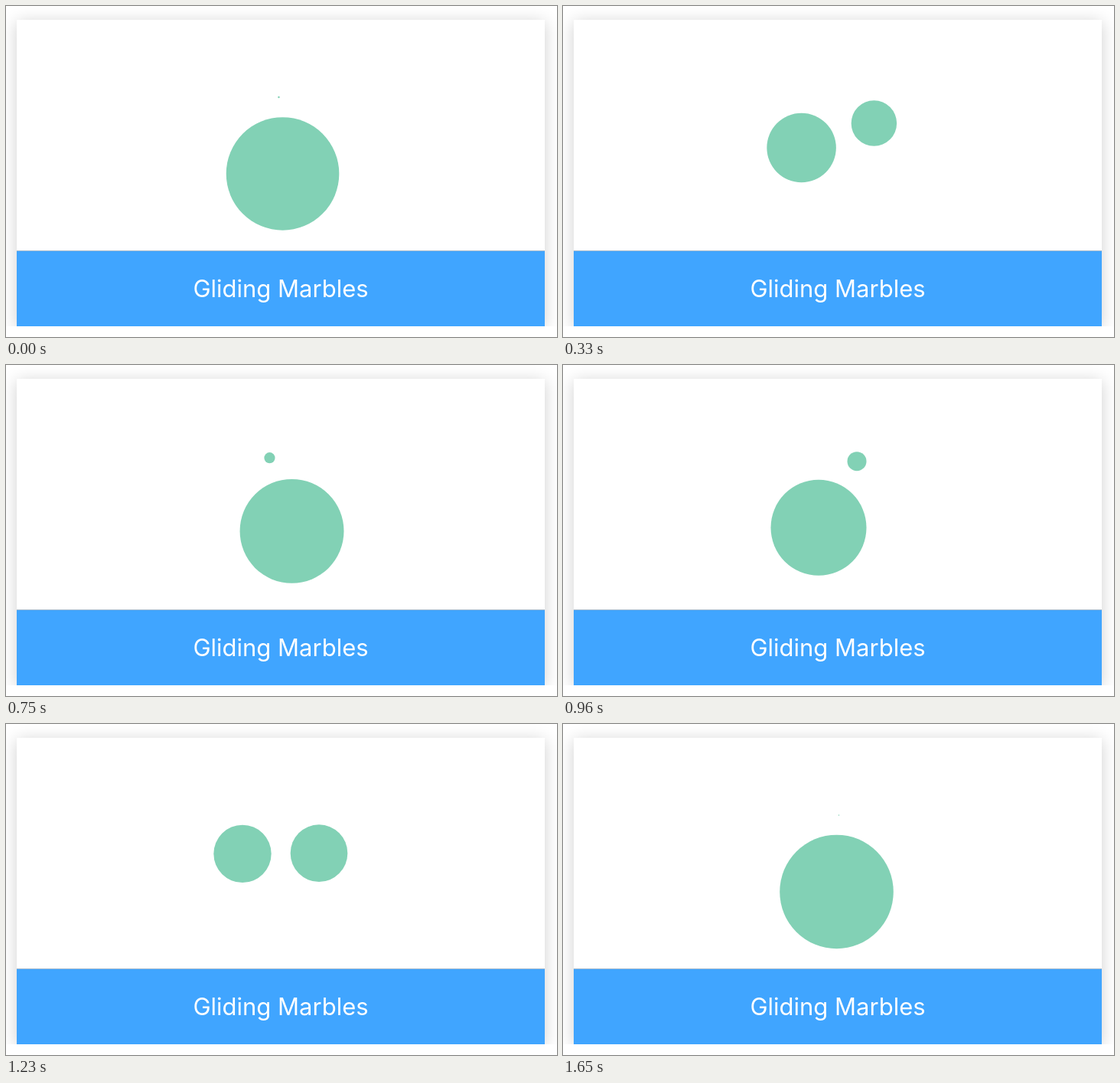
An HTML page that plays this animation: 720x432 px, repeating every 1680 ms.

```html
<!DOCTYPE html>
<html lang="en">
<head>
<meta charset="utf-8">
<title>Gliding Marbles</title>
<style>
  html, body { margin: 0; width: 100%; height: 100%; overflow: hidden; background: #fff; }
  .view { position: absolute; left: 0; top: 0; width: 720px; height: 418px; overflow: hidden; }
  .card {
    position: absolute; left: 14px; top: 18px; width: 690px; height: 400px;
    background: #fff; box-shadow: 0 3px 20px rgba(0, 0, 0, .19);
  }
  svg { position: absolute; left: 0; top: 0; }
  .ball { fill: #82d1b5; }
  text { font: 400 31px Inter, Roboto, sans-serif; fill: #fff; text-anchor: middle; }
</style>
</head>
<body>
<div class="view">
  <div class="card"></div>
  <svg width="720" height="418">
    <circle class="ball"/>
    <circle class="ball"/>
    <rect x="14" y="319" width="690" height="99" fill="#40a5ff"/>
    <rect x="14" y="319" width="690" height="1" fill="#a9bccd"/>
    <text x="359" y="380">Gliding Marbles</text>
  </svg>
</div>
<script>
  const LOOP = 1680, STEP = 30;
  const CENTER = { x: 359, y: 169 }, ORBIT = 50, MAX_RADIUS = 75;
  const balls = document.querySelectorAll('.ball');

  // [ms, degrees clockwise from the bottom of the orbit]
  const turns = [
    [0, -2.9], [330, 71.4], [750, 163.1], [960, 210],
    [1230, 269.6], [1410, 309.9], [1650, 361.7]
  ];

  function angleAt(time) {
    const next = Math.max(1, turns.findIndex(([t]) => t >= time));
    const [t0, a0] = turns[next - 1], [t1, a1] = turns[next];
    return a0 + (a1 - a0) * (time - t0) / (t1 - t0);
  }

  // Size falls evenly with the angle from the bottom and reaches zero at the top.
  function place(ball, degrees) {
    const angle = degrees * Math.PI / 180;
    const turn = ((degrees % 360) + 360) % 360;
    ball.setAttribute('cx', CENTER.x - ORBIT * Math.sin(angle));
    ball.setAttribute('cy', CENTER.y + ORBIT * Math.cos(angle));
    ball.setAttribute('r', MAX_RADIUS * Math.abs(1 - turn / 180));
  }

  function draw() {
    const time = Math.floor(performance.now() % LOOP / STEP) * STEP;
    const angle = angleAt(time);
    place(balls[0], angle);
    place(balls[1], angle + 180);
    requestAnimationFrame(draw);
  }
  draw();
</script>
</body>
</html>
```
